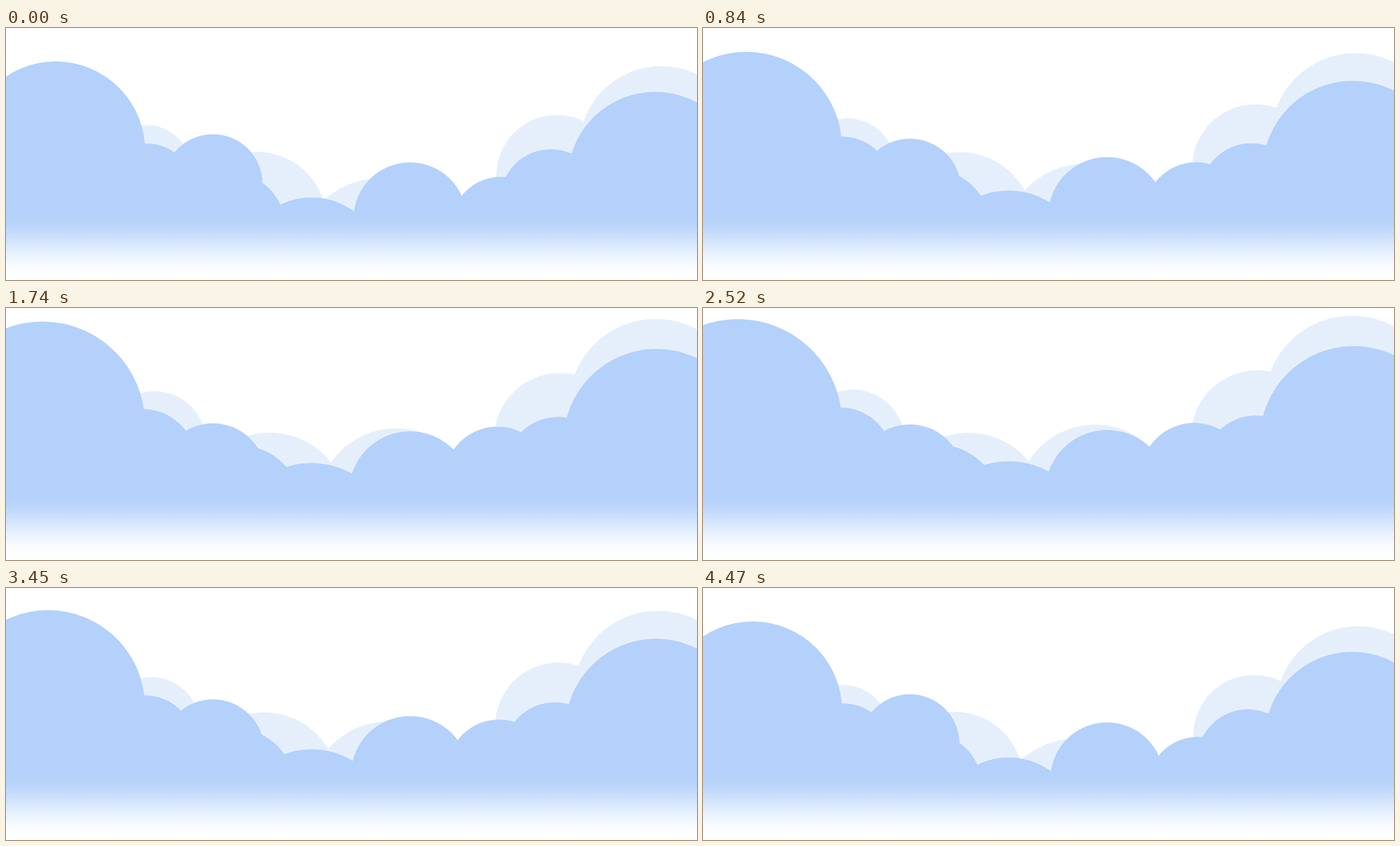
Recreate the animation shown at these times as an HTML page with a canvas. Size 1239x452 px, loop 4500 ms.

```html
<!DOCTYPE html>
<html lang="en">
<head>
<meta charset="utf-8">
<title>Clouds</title>
<style>
  html, body { margin: 0; width: 100%; height: 100%; overflow: hidden; background: #fff; }
  canvas { display: block; width: 1239px; height: 452px; }
</style>
</head>
<body>
<canvas id="sky" width="1239" height="452"></canvas>
<script>
const W = 1239, H = 452, LOOP = 4500, STEP = 30;
const PEAK = 2240, REST = 4410;
const MIST_TOP = 330, MIST_END = 448;
const ctx = document.getElementById('sky').getContext('2d');

// A round puff at rest, and how far it drifts right, lifts and grows at the peak.
const puff = (x, top, r, { drift = 0, lift, grow }) => ({ x, top, r, drift, lift, grow });

const pale = [
  puff(251, 174, 83, { drift: 20, lift: 32, grow: 12 }),
  puff(450, 222, 125, { drift: 30, lift: -2, grow: 17 }),
  puff(670, 270, 149, { drift: 38, lift: 70, grow: -9 }),
  puff(988, 156, 109, { drift: 7, lift: 51, grow: 12 }),
  puff(1175, 68.5, 148, { drift: -13, lift: 63, grow: 10 })
];
const deep = [
  puff(89, 60, 160.5, { drift: -30.5, lift: 46, grow: 30 }),
  puff(252, 207, 86, { drift: -7, lift: 33, grow: 9 }),
  puff(371, 190.5, 89, { lift: -21, grow: 8 }),
  puff(406, 261, 94, { drift: 15, lift: 19, grow: 25 }),
  puff(548, 304, 130, { lift: 33.5, grow: 22.5 }),
  puff(724.5, 241, 101.5, { lift: 25.5, grow: 10.5 }),
  puff(887, 267, 89, { drift: -7, lift: 70, grow: 9 }),
  puff(977, 217.5, 91, { drift: 17, lift: 28.5, grow: 4.5 }),
  puff(1164, 114.5, 157, { drift: 3, lift: 53, grow: 12.5 })
];

// Steady rise to the peak, steady fall, short rest.
const swell = t => Math.max(0, Math.min(t / PEAK, (REST - t) / (REST - PEAK)));

// The cloud base fades smoothly into the white page.
const mist = ctx.createLinearGradient(0, MIST_TOP, 0, MIST_END);
for (let u = 0; u <= 1; u += 1 / 16) {
  mist.addColorStop(u, `rgba(255,255,255,${u * u * (3 - 2 * u)})`);
}

function drawPuffs(puffs, color, k) {
  ctx.fillStyle = color;
  ctx.beginPath();
  for (const p of puffs) {
    const x = p.x + p.drift * k;
    const top = p.top - p.lift * k;
    const r = p.r + p.grow * k;
    ctx.moveTo(x - r, H);
    ctx.arc(x, top + r, r, Math.PI, 2 * Math.PI);
    ctx.lineTo(x + r, H);
    ctx.closePath();
  }
  ctx.fill();
}

function draw(t) {
  const k = swell(t);
  ctx.fillStyle = '#fff';
  ctx.fillRect(0, 0, W, H);
  drawPuffs(pale, '#e5effc', k);
  drawPuffs(deep, '#b3d1fa', k);
  ctx.fillStyle = mist;
  ctx.fillRect(0, MIST_TOP, W, H - MIST_TOP);
}

const start = performance.now();
function tick() {
  const t = (performance.now() - start) % LOOP;
  draw(Math.floor(t / STEP) * STEP);
  requestAnimationFrame(tick);
}
tick();
</script>
</body>
</html>
```
